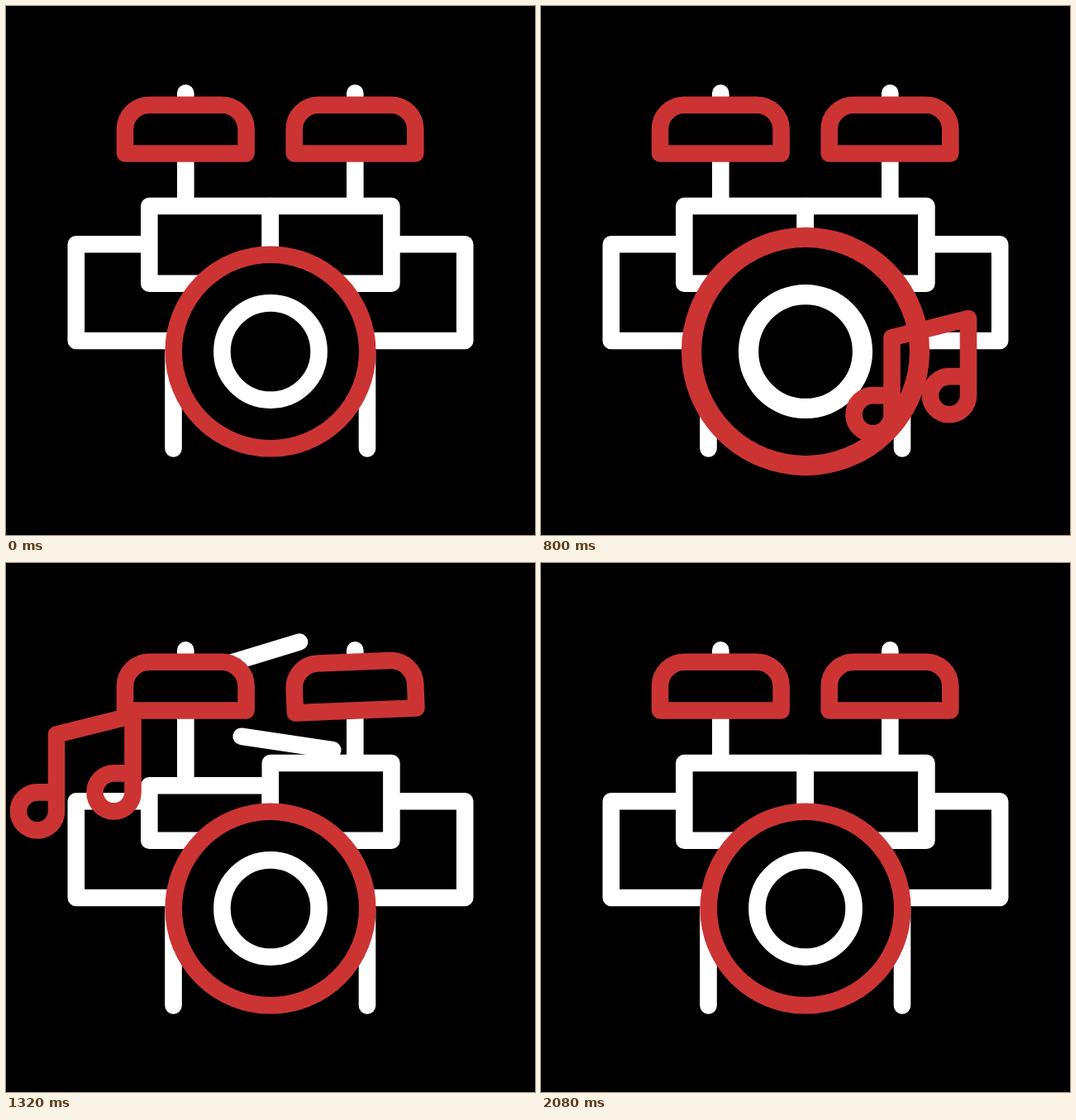
Animation, 640 px wide and 640 px high, one loop 2400 ms. Source, as an HTML page:

```html
<!DOCTYPE html>
<html>
<head>
<meta charset="utf-8">
<title>Drum kit</title>
<style>
  html, body { margin: 0; width: 100%; height: 100%; overflow: hidden; background: #000; }
  svg { display: block; width: 100%; height: 100%; fill: none; stroke: #fff; stroke-width: 20.6;
        stroke-linecap: round; stroke-linejoin: round; }
  .red { stroke: #cc3434; }
  .solid { fill: #000; }
</style>
</head>
<body>
<svg viewBox="0 0 640 640">
  <defs>
    <path id="cymbal" d="M-73.3 29.4V0a29.3 29.3 0 0 1 29.3-29.3H44a29.3 29.3 0 0 1 29.3 29.3V29.4Z"/>
    <path id="note" d="M517 502H494a23 23 0 1 0 23 23V432L424.5 455V548a23 23 0 1 1-23-23h23"/>
  </defs>
  <path d="M173 288.3H84.8V405H203M467 288.3H555.2V405H437M202.5 418V535.5M437 418V535.5"/>
  <path id="poles"/>
  <line id="tomStick"/>
  <rect id="leftTom" class="solid" x="173.3" width="146.5"/>
  <rect class="solid" x="319.8" y="242" width="146.6" height="93.8"/>
  <g id="bass">
    <circle class="red solid" r="117.3"/>
    <circle r="58.6"/>
  </g>
  <use id="leftNote" class="red" href="#note"/>
  <line id="cymbalStick"/>
  <use class="red solid" href="#cymbal" x="217.3" y="149.1"/>
  <use id="rightCymbal" class="red solid" href="#cymbal"/>
  <use id="rightNote" class="red" href="#note"/>
</svg>
<script>
const LOOP = 2400;
const el = id => document.getElementById(id);
const set = (id, attrs) => {
  for (const name in attrs) el(id).setAttribute(name, attrs[name]);
};

// Eased progress from 0 to 1 over a time span.
const ease = (t, start, length) => {
  const u = Math.min(1, Math.max(0, (t - start) / length));
  return u * u * (3 - 2 * u);
};

// Eased value through [time, value] keys.
const track = (t, keys) => keys.reduce((v, [time, value], i) =>
  i ? v + (value - keys[i - 1][1]) * ease(t, keys[i - 1][0], time - keys[i - 1][0]) : value, 0);

const pulse = (t, start, length) =>
  ease(t, start, length / 2) - ease(t, start + length / 2, length / 2);

function note(id, t, start, x, y) {
  const rise = 192 * ease(t, start, 600);
  set(id, {
    transform: `translate(${x} ${y - rise})`,
    opacity: ease(t, start, 150) - ease(t, start + 430, 150)
  });
}

// The stick grows from its handle to its tip, swings, then shrinks towards the tip.
function stick(id, [x1, y1], [x2, y2], grown, gone, angle) {
  const at = k => [x1 + (x2 - x1) * k, y1 + (y2 - y1) * k];
  const [ax, ay] = at(gone), [bx, by] = at(grown);
  set(id, {
    x1: ax, y1: ay, x2: bx, y2: by,
    visibility: grown > gone ? 'visible' : 'hidden',
    transform: `rotate(${angle} ${(x1 + x2) / 2} ${(y1 + y2) / 2})`
  });
}

function draw(t) {
  const beat = pulse(t, 0, 320) + pulse(t, 612, 350) + pulse(t, 970, 320);
  set('bass', { transform: `translate(320 418) scale(${1 + 0.18 * beat})` });

  const top = 242 + track(t, [[1250, 0], [1315, 27.5], [1420, 0]]);
  set('leftTom', { y: top, height: 335.8 - top });
  set('poles', { d: `M217.3 105.3V${top}M422.3 105.3V242` });

  stick('tomStick', [393, 236], [287, 200], ease(t, 834, 150), ease(t, 1400, 250),
    track(t, [[1170, 0], [1270, -25], [1361, 0]]));
  stick('cymbalStick', [248, 128], [355, 95.5], ease(t, 960, 130), ease(t, 1650, 190),
    track(t, [[1090, 0], [1200, -36], [1300, 0], [1580, 0], [1660, -36], [1740, 0]]));

  const tilt = track(t, [[1300, 0], [1400, -20], [1520, 20], [1640, 0], [1740, 0],
    [1820, -20], [1920, 14], [2010, -6], [2080, 0]]);
  set('rightCymbal', { transform: `translate(422 149.1) rotate(${tilt})` });

  note('rightNote', t, 560, 0, 14.2);
  note('leftNote', t, 1060, -363.5, -170.2);
}

const begin = performance.now();
function frame() {
  draw((performance.now() - begin) % LOOP);
  requestAnimationFrame(frame);
}
frame();
</script>
</body>
</html>
```
